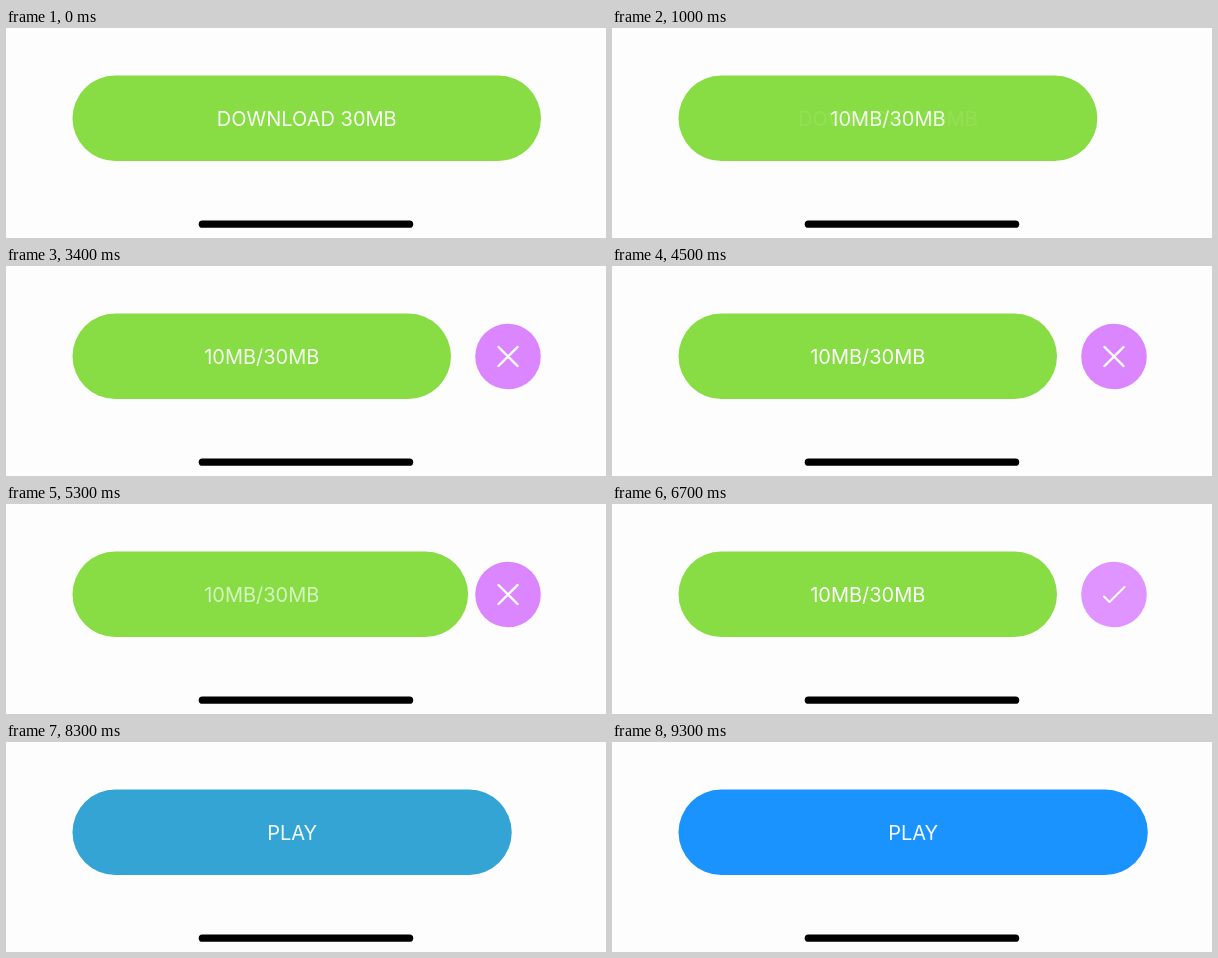
Recreate the animation shown at these times as an HTML page. Size 600x210 px, loop 9400 ms.

```html
<!DOCTYPE html>
<html lang="en">
<head>
<meta charset="utf-8">
<title>Download button</title>
<style>
html, body { margin: 0; width: 100%; height: 100%; overflow: hidden; background: #fefdfe; }
svg { display: block; width: 600px; height: 210px; }
text { font: 400 20px Inter, Roboto, sans-serif; fill: #fff; text-anchor: middle; }
.icon { fill: none; stroke: #fff; stroke-linecap: round; stroke-linejoin: round; }
</style>
</head>
<body>
<svg viewBox="0 0 600 210">
  <rect id="pill" x="66.5" y="47.5" height="85.5" rx="42.75"/>
  <g id="labels">
    <text id="start" y="98">DOWNLOAD 30MB</text>
    <text id="progress" y="98">10MB/30MB</text>
    <text id="play" y="98">PLAY</text>
  </g>
  <g id="badge">
    <circle cx="502" cy="90.5" r="32.8" fill="#db86ff"/>
  </g>
  <path id="cross" class="icon" stroke-width="2.4" d="M492.5 81l19 19m0-19l-19 19"/>
  <path id="check" class="icon" stroke-width="2" d="M492 92.5l5.5 5.5 15-15"/>
  <rect x="192.7" y="192.5" width="214.5" height="7.3" rx="3.65"/>
</svg>
<script>
const LOOP = 9400;
const LEFT = 66.5, WIDE = 468.5, SHRINK = 90;
const SHRINK_AT = 680, GROW_AT = 7917;
const GREEN = [136, 220, 68], BLUE = [27, 147, 255];
const $ = id => document.getElementById(id);
const pill = $('pill');

const clamp = x => Math.min(1, Math.max(0, x));
const ramp = (t, from, to) => clamp((t - from) / (to - from));
const ease = x => x * x * (3 - 2 * x);
const fade = (t, from, to) => ease(ramp(t, from, to));

// Underdamped spring from 0 to 1
function spring(ms) {
  if (ms <= 0) return 0;
  const a = 3.5 * ms / 1000, damp = 0.923;
  return 1 - Math.exp(-damp * a) * (Math.cos(a) + damp * Math.sin(a));
}

// Two soft beats while the download runs
function beat(t, half) {
  const bump = mid => Math.cos(Math.PI / 2 * Math.min(1, Math.abs(t - mid) / half)) ** 2;
  return bump(2750) + bump(5450);
}

function show(id, alpha) {
  $(id).setAttribute('opacity', alpha.toFixed(3));
}

function draw(t) {
  const width = WIDE - SHRINK * (spring(t - SHRINK_AT) - spring(t - GROW_AT));
  pill.setAttribute('width', width + 19.5 * beat(t, 650));

  const tint = ramp(t, GROW_AT, GROW_AT + 500);
  const rgb = GREEN.map((c, i) => Math.round(c + (BLUE[i] - c) * tint));
  pill.setAttribute('fill', `rgb(${rgb})`);

  $('labels').setAttribute('transform', `translate(${LEFT + width / 2} 0)`);
  const begun = fade(t, SHRINK_AT, SHRINK_AT + 400);
  const done = fade(t, GROW_AT, GROW_AT + 300);
  show('start', 0.95 * (1 - begun));
  show('progress', begun * (1 - done) * (1 - 0.35 * beat(t, 950)));
  show('play', 0.95 * done);

  const badge = fade(t, 1360, 2210) * (1 - fade(t, 6520, 7350));
  const swap = fade(t, 5950, 6350);
  const icon = clamp(badge * 4);
  show('badge', badge);
  show('cross', icon * (1 - swap));
  show('check', icon * swap);
}

function tick() {
  draw(performance.now() % LOOP);
  requestAnimationFrame(tick);
}
tick();
</script>
</body>
</html>
```
